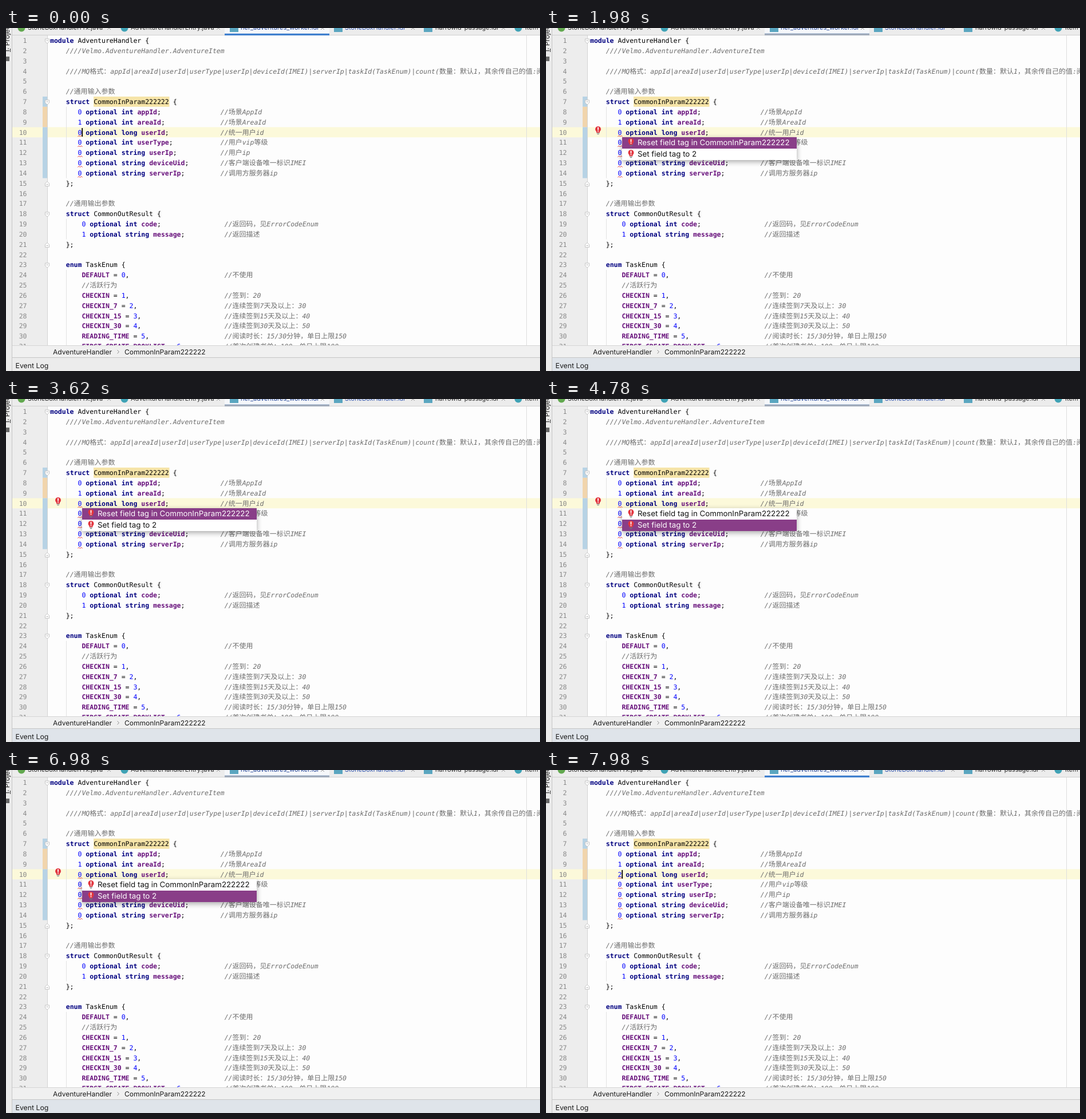
An HTML page for the animation above (8000 ms loop, 933 by 600 pixels).

```html
<!DOCTYPE html>
<html lang="en">
<head>
<meta charset="utf-8">
<title>Editor quick fix</title>
<style>
  html, body { margin: 0; width: 100%; height: 100%; overflow: hidden; background: #fdfdfd; }
  svg { display: block; width: 933px; height: 600px; }
  text { white-space: pre; text-rendering: geometricPrecision; font: 12px Inter, sans-serif; fill: #1c1c1c; }
  .code text { font: 11.5px "DejaVu Sans Mono", monospace; fill: #000; }
  .code .number { fill: #00f; }
  .code .line-no { fill: #888; text-anchor: end; }
  .keyword { fill: #000080; font-weight: bold; }
  .field { fill: #660e7a; font-weight: bold; }
  .comment { fill: #6c6c6c; font-style: italic; }
  .cjk { font: normal 12px "Noto Sans CJK SC", "Noto Sans CJK", sans-serif; }
  .tabs text { font-size: 11px; }
  .status text { font-size: 12.3px; }
  .popup text { font-size: 13.3px; fill: #111; }
  .popup .chosen text { fill: #fff; }
  .squiggle { fill: none; stroke: #e03030; stroke-width: 1; }

  .caret, .bulb, .popup, .before, .after, .first, .second, .unfocused { animation: 8s step-end infinite; }
  .caret { animation-name: caret; }
  .bulb { animation-name: bulb; }
  .popup, .unfocused { animation-name: open; }
  .before { animation-name: before; }
  .after { animation-name: after; }
  .first { animation-name: first; }
  .second { animation-name: second; }
  @keyframes caret { 0% { opacity: 1 } 7.5% { opacity: 0 } 13.75% { opacity: 1 } 20% { opacity: 0 } 95.5%, 100% { opacity: 1 } }
  @keyframes bulb { 0% { opacity: 0 } 10% { opacity: 1 } 95.5%, 100% { opacity: 0 } }
  @keyframes open { 0% { opacity: 0 } 22% { opacity: 1 } 95.5%, 100% { opacity: 0 } }
  @keyframes before { 0% { opacity: 1 } 95.5%, 100% { opacity: 0 } }
  @keyframes after { 0% { opacity: 0 } 95.5%, 100% { opacity: 1 } }
  @keyframes first { 0% { opacity: 1 } 56.75%, 100% { opacity: 0 } }
  @keyframes second { 0% { opacity: 0 } 56.75%, 100% { opacity: 1 } }
</style>
</head>
<body>
<svg id="stage" viewBox="0 0 933 600"></svg>
<script>
const PITCH = 17.83, COLUMN = 6.924, LEFT = 77;
const lineTop = line => 13 + PITCH * (line - 1);
const baseline = line => lineTop(line) + 13.1;

const rect = (x, y, w, h, fill, extra = '') =>
  `<rect x="${x}" y="${y}" width="${w}" height="${h}" fill="${fill}" ${extra}/>`;
const text = (x, y, content, extra = '') => `<text x="${x}" y="${y}" ${extra}>${content}</text>`;
const path = (d, stroke, extra = '') => `<path d="${d}" fill="none" stroke="${stroke}" ${extra}/>`;
const group = (name, content) => `<g class="${name}">${content}</g>`;

const input = (tag, declaration, note) => `       ${tag} optional ${declaration};`.padEnd(43) + '//' + note;
const output = (tag, declaration, note) => `        ${tag} optional ${declaration};`.padEnd(44) + '//' + note;
const constant = (name, value, note) => `        ${name} = ${value},`.padEnd(44) + '//' + note;

const lines = [
  'module AdventureHandler {',
  '    ////Velmo.AdventureHandler.AdventureItem',
  '',
  '    ////MQ格式：appId|areaId|userId|userType|userIp|deviceId(IMEI)|serverIp|taskId(TaskEnum)|count(数量：默认1，其余传自己的值:阅',
  '',
  '    //通用输入参数',
  '    struct CommonInParam222222 {',
  input(0, 'int appId', '场景AppId'),
  input(1, 'int areaId', '场景AreaId'),
  input(' ', 'long userId', '统一用户id'),
  input(0, 'int userType', '用户vip等级'),
  input(0, 'string userIp', '用户ip'),
  input(0, 'string deviceUid', '客户端设备唯一标识IMEI'),
  input(0, 'string serverIp', '调用方服务器ip'),
  '    };',
  '',
  '    //通用输出参数',
  '    struct CommonOutResult {',
  output(0, 'int code', '返回码，见ErrorCodeEnum'),
  output(1, 'string message', '返回描述'),
  '    };',
  '',
  '    enum TaskEnum {',
  constant('DEFAULT', 0, '不使用'),
  '        //活跃行为',
  constant('CHECKIN', 1, '签到：20'),
  constant('CHECKIN_7', 2, '连续签到7天及以上：30'),
  constant('CHECKIN_15', 3, '连续签到15天及以上：40'),
  constant('CHECKIN_30', 4, '连续签到30天及以上：50'),
  constant('READING_TIME', 5, '阅读时长：15/30分钟，单日上限150'),
  constant('FIRST_CREATE_BOOKLIST', 6, '首次创建书单：100，单日上限100')
];

const TOKEN = /(\/\/.*)|\b(module|struct|enum|optional|int|long|string)\b|(\w+(?=;)|[A-Z_0-9]+(?= =))|\b(\d+)\b/g;
const KINDS = ['comment', 'keyword', 'field', 'number'];
const span = (kind, content) => `<tspan class="${kind}">${content}</tspan>`;
const highlight = line => line.replace(TOKEN, (token, ...groups) => {
  const kind = KINDS[groups.slice(0, 4).findIndex(Boolean)];
  return span(kind, token.replace(/[\u3000-\u9fff\uff00-\uffef]+/g, run => span('cjk', run)));
});

function fold(line, closing) {
  const y = lineTop(line) + 10, s = closing ? -1 : 1;
  return `<path d="M68.5 ${y - 4 * s}h7v${5 * s}l-3.5 ${3 * s}l-3.5 ${-3 * s}z" fill="#fff" stroke="#c4c4c4"/>` +
    path(`M70.5 ${y - s}h3`, '#aaa');
}

function squiggle(line) {
  const y = baseline(line) + 3.5;
  return `<path class="squiggle" d="M125.5 ${y}l2-2 2 2 2-2 2 2"/>`;
}

function bulb(x, y) {
  return `<circle cx="${x}" cy="${y - 2}" r="5" fill="#e2363f"/>` +
    rect(x - 3, y + 1, 6, 3, '#e2363f') +
    rect(x - .9, y - 5.5, 1.8, 5, '#fff') + rect(x - .9, y + .6, 1.8, 1.8, '#fff') +
    rect(x - 2.5, y + 4.5, 5, 1, '#777') + rect(x - 1.5, y + 6.2, 3, 1, '#777');
}

function editor() {
  const bar = (from, to, color) => rect(64, lineTop(from), 8, PITCH * (to - from), color);
  const blue = '#b7d3e5', orange = '#f1d5ac';
  const code = lines.map((line, i) =>
    text(36.5, baseline(i + 1), i + 1, 'class="line-no"') + text(LEFT, baseline(i + 1), highlight(line))).join('');
  const tag = (name, digit) =>
    text(LEFT + 7 * COLUMN, baseline(10), digit, `class="number ${name}"`);
  const guides = [[8, 15], [19, 21], [24, 32]].map(([from, to]) =>
    path(`M105.5 ${lineTop(from)}V${lineTop(to)}`, '#e2e2e2')).join('');
  return rect(11, 12, 61, 543, '#ededed') + rect(72, 12, 861, 543, '#fdfdfd') +
    rect(11, lineTop(10), 922, PITCH, '#fcf9da') +
    path('M72.5 12V555', '#d4d4d4') + path('M909.5 12V555', '#dedede') + guides +
    bar(7, 8, blue) + bar(8, 10, orange) + bar(10, 15, blue) +
    group('after', bar(10, 11, orange)) +
    rect(153, lineTop(7), 19 * COLUMN + .9, PITCH, '#f6e4a8') +
    [1, 7, 18, 23].map(n => fold(n)).join('') + [15, 21].map(n => fold(n, true)).join('') +
    group('code', code + tag('before', 0) + tag('after', 2)) +
    [10, 11, 12, 13, 14].map(squiggle).join('') +
    rect(132.3, 175, 1.8, 15, '#000', 'class="caret"') +
    group('bulb', bulb(91, 179));
}

function tabBar() {
  const tab = (x, name, closeX, color = '#333') => text(x, 3, name, `style="fill:${color}"`) +
    (closeX ? path(`M${closeX - 3} -3l6 6m0-6l-6 6`, '#999') : '');
  const circle = (x, color) => `<circle cx="${x}" cy="0" r="6.5" fill="${color}"/>`;
  const square = x => rect(x, -8, 15, 15, '#5aa6c0');
  return rect(11, 0, 922, 12, '#ececec') + path('M11 12.5H933', '#d0d0d0') +
    rect(382, 0, 183, 12, '#f5f7fa') + rect(382, 9.7, 183, 3.3, '#3f7fce') +
    rect(382, 9.7, 183, 3.3, '#a1abba', 'class="unfocused"') +
    circle(27, '#62a84f') + circle(207, '#3fa2b5') + circle(895, '#3fa2b5') +
    [391, 573, 730].map(square).join('') +
    tab(38, 'StoneBoxHandlerFrx.java', 180) +
    tab(218, 'AdventureHandlerEntry.java', 371) +
    tab(410, 'ner_adventures_worker.idl', 553, '#27489a') +
    tab(592, 'StoneBoxHandler.idl', 711, '#3458b0') +
    tab(750, 'narrowid-passage.idl', 869) +
    tab(907, 'Item');
}

function frame() {
  return rect(0, 0, 11, 600, '#ebebeb') + path('M10.5 0V600', '#c6c6c6') +
    text(0, 0, '1: Project', 'transform="translate(6 43) rotate(-90)"') +
    path('M7.5 36V42', '#333') + rect(0, 50, 6, 8, '#666') +
    rect(11, 555, 922, 22, '#f0f0f0') + path('M11 555.5H933', '#d5d5d5') +
    rect(11, 577, 922, 23, '#ececec') +
    rect(11, 577, 922, 23, '#dfe4ea', 'class="unfocused"') +
    path('M11 576.5H933', '#c6c6c6') +
    text(82, 570.5, 'AdventureHandler') + path('M194.5 563.5l3 3-3 3', '#888') +
    text(207, 570.5, 'CommonInParam222222') + group('status', text(16.5, 595, 'Event Log'));
}

function popup() {
  const row = (y, label, chosen) => group(chosen ? 'chosen' : '',
    rect(133, y, 305, 20, chosen ? '#893e88' : '#fff') + bulb(148.5, y + 9) + text(160, y + 14.3, label));
  const menu = chosen => row(191, 'Reset field tag in CommonInParam222222', chosen === 0) +
    row(211, 'Set field tag to 2', chosen === 1);
  return rect(133, 191, 305, 40, '#fff', 'style="filter:drop-shadow(0 3px 5px #0005)"') +
    group('first', menu(0)) + group('second', menu(1));
}

document.getElementById('stage').innerHTML =
  editor() + group('tabs', tabBar()) + frame() + group('popup', popup());
</script>
</body>
</html>
```
